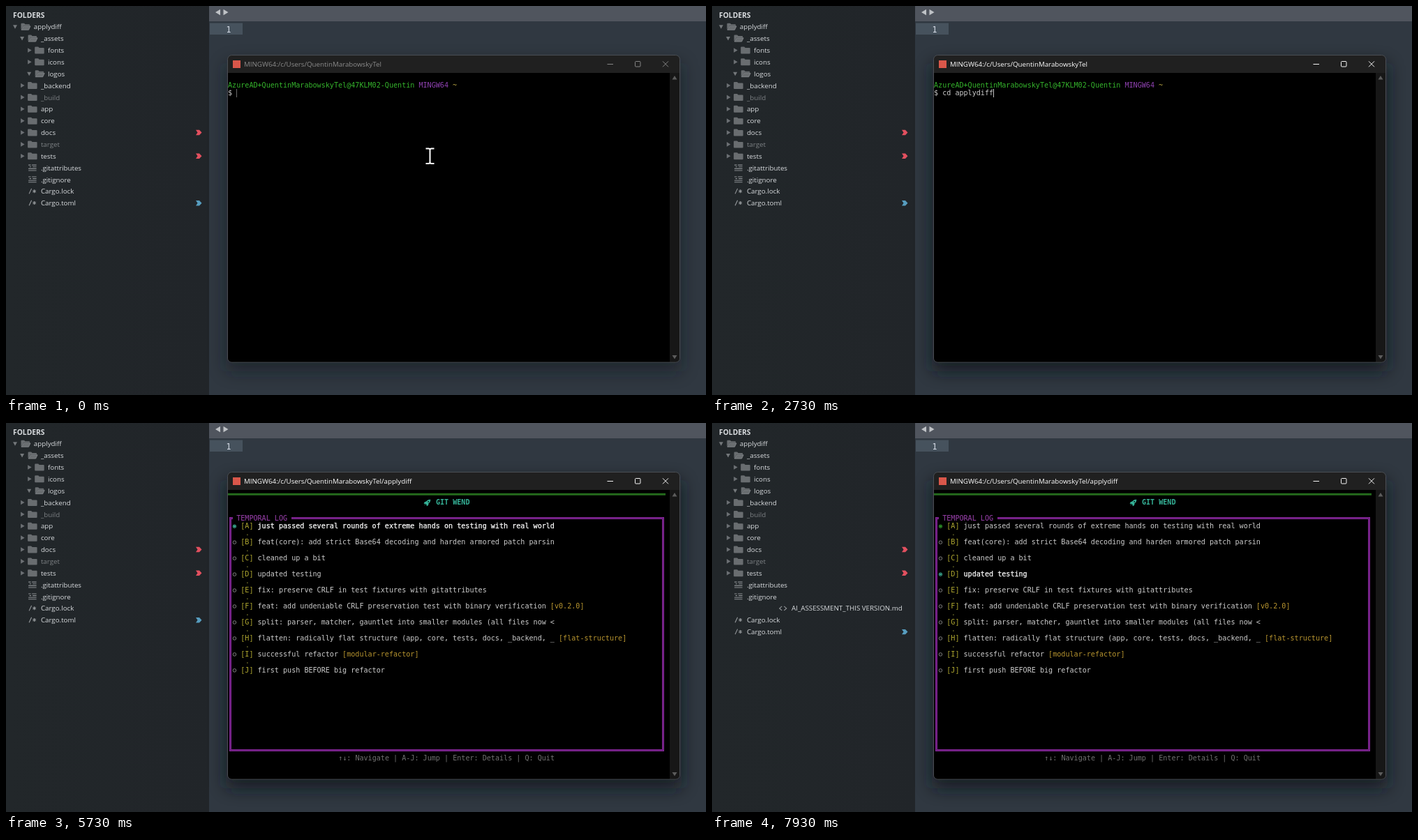
Write an HTML page that moves like this. It is 1003 by 558 pixels and loops after 8000 ms.

```html
<!DOCTYPE html>
<html lang="en">
<head>
<meta charset="utf-8">
<title>Terminal session</title>
<style>
  html, body { margin: 0; width: 100%; height: 100%; overflow: hidden; background: #303841; }
  svg { display: block; width: 1003px; height: 558px; }
  text { white-space: pre; }
  .ui { font: 9.75px "Open Sans", "Noto Sans", sans-serif; fill: #d8dbde; }
  .mono { font: 10.1px "DejaVu Sans Mono", "Liberation Mono", monospace; fill: #bfbfbf; }
</style>
</head>
<body>
<svg id="stage" viewBox="0 0 1003 558" xmlns="http://www.w3.org/2000/svg">
  <defs>
    <clipPath id="sideClip"><rect width="291" height="558"/></clipPath>
    <filter id="blur" x="-20%" y="-20%" width="140%" height="140%"><feGaussianBlur stdDeviation="12"/></filter>
    <linearGradient id="side" x1="0" x2="1" y1="0" y2="0">
      <stop offset="0" stop-color="#22272a"/><stop offset="1" stop-color="#212529"/>
    </linearGradient>
  </defs>
  <rect width="1003" height="558" fill="#303841"/>
  <rect x="291" width="712" height="22" fill="#50555e"/>
  <rect x="292" y="24.5" width="47" height="16.5" fill="#46525d"/>
  <path d="M300 9l7-4.2v8.4zM318.5 9l-7-4.2v8.4z" fill="#bfc2c6"/>
  <text x="319" y="37.5" text-anchor="middle" font-family="DejaVu Sans Mono, monospace" font-size="11.5" fill="#d8dee9">1</text>
  <rect width="291" height="558" fill="url(#side)"/>
  <g id="tree" clip-path="url(#sideClip)">
    <text class="ui" x="10" y="16.7" style="font-size:10.3px;font-weight:700">FOLDERS</text>
  </g>
  <rect id="shadow" x="315" y="82" width="653" height="442" rx="8" fill="#10121c" filter="url(#blur)"/>
  <rect x="317.5" y="70.5" width="648" height="440.5" rx="6" fill="#202020" stroke="#4a4e53"/>
  <path d="M318 96h633v414.5h-627.5a5.5 5.5 0 0 1-5.5-5.5z" fill="#000"/>
  <path d="M951 96h14v409a5.5 5.5 0 0 1-5.5 5.5h-8.5z" fill="#171717"/>
  <path d="M954.5 105.5l3.5-5.5 3.5 5.5zM954.5 501l3.5 5.5 3.5-5.5z" fill="#5c5c5c"/>
  <rect x="325" y="78" width="11" height="11" fill="#d9574a"/>
  <text id="caption" class="ui" x="341" y="87"></text>
  <path id="buttons" d="M861.5 83.5h8.5M902.5 79.5h5.5q1 0 1 1v5.5q0 1-1 1h-5.5q-1 0-1-1v-5.5q0-1 1-1zM941 79.3l8 8M949 79.3l-8 8" fill="none"/>
  <g id="shell"></g>
  <g id="log"></g>
  <path id="bar" d="M318 102.3h627" stroke="#246b1c" stroke-width="3"/>
  <rect id="caret" width="1" height="12"/>
  <g id="pointer" fill="none">
    <path d="M601.5 204.5h4q2 0 2 2 0-2 2-2h4M607.5 206v18M601.5 226h4q2 0 2-2 0 2 2 2h4" stroke="#fff" stroke-width="2"/>
  </g>
</svg>
<script>
const LOOP = 8000, COL = 6.08, LINE = 11.48, ROW = 16.87, SLIDE = 254;
const USER = "QuentinMarabowskyTel";
const HOST = "AzureAD+" + USER + "@47KLM02-Quentin";
const C = { green: "#35b52c", purple: "#8f41b1", yellow: "#bda945", cyan: "#38a99b", text: "#cccccc" };

const $ = id => document.getElementById(id);
const colX = c => 318 + c * COL;
const lineY = n => 117 + n * LINE;
const clamp = v => Math.max(0, Math.min(1, v));
const ramp = (t, a, b) => clamp((t - a) / (b - a));
const show = (el, on) => { el.style.display = on ? "" : "none"; };

function add(parent, tag, attrs = {}, content) {
  const el = document.createElementNS("http://www.w3.org/2000/svg", tag);
  for (const k in attrs) el.setAttribute(k, attrs[k]);
  if (content !== undefined) el.textContent = content;
  parent.appendChild(el);
  return el;
}

// One terminal line made of [text, colour] runs
function line(parent, col, n, ...runs) {
  const el = add(parent, "text", { class: "mono", x: colX(col), y: lineY(n) });
  for (const [s, fill] of runs) add(el, "tspan", { style: "fill:" + fill }, s);
  return el;
}

// Sidebar: [name, depth, kind, flag colour]; kinds: o open, c closed, d dimmed, t text, s source, m markup
const RED = "#e2505f", BLUE = "#579dbf";
const ITEMS = [
  ["applydiff", 0, "o"], ["_assets", 1, "o"], ["fonts", 2, "c"], ["icons", 2, "c"], ["logos", 2, "o"],
  ["_backend", 1, "c"], ["_build", 1, "d"], ["ai", 1, "c"], ["app", 1, "c"], ["core", 1, "c"],
  ["docs", 1, "c", RED], ["target", 1, "d"], ["tests", 1, "c", RED],
  [".gitattributes", 1, "t"], [".gitignore", 1, "t"], ["AI_ASSESSMENT_THIS VERSION.md", 1, "m"],
  ["Cargo.lock", 1, "s"], ["Cargo.toml", 1, "s", BLUE]
];

function icon(g, kind) {
  if (kind === "o") {
    add(g, "path", { d: "M10-2.5h6l-3 5.5z", fill: "#74787b" });
    add(g, "path", { d: "M21.5 4v-8q0-1 1-1h3.5l1.5 1.5h5.5q1 0 1 1v1h-8.5z", fill: "#696d70" });
    add(g, "path", { d: "M25.5-.8h9.5l-2.500 5.300h-10.500z", fill: "#696d70", stroke: "#8b8f92", "stroke-width": 0.8 });
  } else if (kind === "c" || kind === "d") {
    add(g, "path", { d: "M11-3.3l5.5 3.3-5.5 3.3z", fill: "#6c7074" });
    add(g, "path", { d: "M21-4q0-1 1-1h4l1.5 1.5h6q1 0 1 1v6.5q0 1-1 1h-11.5q-1 0-1-1z", fill: "#696d70" });
  } else if (kind === "t") {
    add(g, "path", { d: "M22-4h3.5M27-4h6.5M23.5-1.4h2.5M28-1.4h5.5M22 1.2h11.5M22 3.8h11.5", stroke: "#8b8f92", "stroke-width": 1.1 });
  } else if (kind === "s") {
    add(g, "path", { d: "M23 3.5l3.5-7.5M30.5-2.7v5M28.3-1.5l4.4 2.6M32.7-1.5l-4.4 2.6", stroke: "#989c9f", "stroke-width": 1.1 });
  } else {
    add(g, "path", { d: "M26-3l-3.5 3 3.5 3M29-3l3.5 3-3.5 3", fill: "none", stroke: "#989c9f", "stroke-width": 1.1 });
  }
}

const rows = ITEMS.map(([name, depth, kind, flag]) => {
  const g = add($("tree"), "g");
  const body = add(g, "g", { transform: `translate(${depth * 10.1} 0)` });
  icon(body, kind);
  add(body, "text", { class: "ui", x: 39.8, y: 3.6, style: kind === "d" ? "fill:#7d8184" : "" }, name);
  if (flag) add(g, "path", { d: "M272-3.7h5l3.5 3.7-3.5 3.7h-5l2.5-3.7z", fill: flag });
  return g;
});

// Gap opens, then the row slides in; removal runs the other way round
function aiRow(t) {
  return t < 7100
    ? { gap: ramp(t, 6556, 6688), off: 1 - ramp(t, 6688, 6920) }
    : { gap: 1 - ramp(t, 7341, 7475), off: ramp(t, 7200, 7341) };
}
const noteRow = t => ({ gap: ramp(t, 7645, 7780), off: 1 - ramp(t, 7780, 7982) });

function drawTree(t) {
  const moving = { 7: aiRow(t), 15: noteRow(t) };
  let y = 29.7;
  rows.forEach((g, i) => {
    const m = moving[i] || { gap: 1, off: 0 };
    g.setAttribute("transform", `translate(${m.off * SLIDE} ${y})`);
    show(g, m.gap === 1 && m.off < 1);
    y += ROW * m.gap;
  });
}

// Shell
const prompt = (n, ...path) => line($("shell"), 0, n, [HOST, C.green], [" MINGW64", C.purple], ...path);
prompt(0, [" ~", C.yellow]);
const prompt2 = prompt(3, [" ~/applydiff", C.yellow], [" (main)", C.cyan]);
const cmd1 = line($("shell"), 0, 1, ["", C.text]);
const cmd2 = line($("shell"), 0, 4, ["", C.text]);

const KEYS1 = [1030, 1150, 1270, 1400, 1520, 1640, 1760, 1880, 2020, 2140, 2260, 2370];
const KEYS2 = [3430, 3560, 3710, 3840, 3970, 4080, 4190, 4300];
const typed = (s, keys, t) => s.slice(0, keys.filter(k => k <= t).length);
const ENTER1 = 2760, READY = 2900, ENTER2 = 4450, CLEAR = 4860, LOG = 5020;

function drawShell(t) {
  const a = typed("cd applydiff", KEYS1, t), b = typed("git wend", KEYS2, t);
  cmd1.firstChild.textContent = "$ " + a;
  cmd2.firstChild.textContent = t >= READY ? "$ " + b : "";
  show(prompt2, t >= READY);
  show($("shell"), t < CLEAR);
  show($("bar"), t >= CLEAR);
  let col = 0, n = 5;
  if (t < ENTER1) { col = 2 + a.length; n = 1; }
  else if (t < READY) n = 2;
  else if (t < ENTER2) { col = 2 + b.length; n = 4; }
  const caret = $("caret");
  caret.setAttribute("x", Math.round(colX(col) + 0.3));
  caret.setAttribute("y", Math.round(lineY(n) - 9.5));
  caret.setAttribute("fill", t < FOCUS ? "#6a6a6a" : "#bfbfbf");
  show(caret, t < LOG);
}

// Log viewer
const COMMITS = [
  ["just passed several rounds of extreme hands on testing with real world"],
  ["feat(core): add strict Base64 decoding and harden armored patch parsin"],
  ["cleaned up a bit"],
  ["updated testing"],
  ["fix: preserve CRLF in test fixtures with gitattributes"],
  ["feat: add undeniable CRLF preservation test with binary verification", "v0.2.0"],
  ["split: parser, matcher, gauntlet into smaller modules (all files now <"],
  ["flatten: radically flat structure (app, core, tests, docs, _backend, _", "flat-structure"],
  ["successful refactor", "modular-refactor"],
  ["first push BEFORE big refactor"]
];
const log = $("log");
line(log, 49, 0, ["GIT WEND", "#35b398"]).style.fontWeight = "700";
add(log, "path", { d: "M608 110q-4 0-6 3l-2 .5-1 2 2 0 2 2 0 1.5 2-1.5 0-2q3-2 3-5.5zM599.5 118l1.8-1.8", fill: "#35b398", stroke: "#35b398", "stroke-width": 0.7 });
add(log, "circle", { cx: 605.2, cy: 112.8, r: 0.9, fill: "#000" });
const FRAME = "M325 136.500h-3.500v333h620v-333h-532.500";
add(log, "path", { d: FRAME, fill: "none", stroke: "#85289a", "stroke-width": 3 });
add(log, "path", { d: FRAME, fill: "none", stroke: "#641a74", "stroke-width": 1 });
line(log, 2, 2, ["TEMPORAL LOG", "#9c40ae"]);
line(log, 26, 32, ["↑↓: Navigate | A-J: Jump | Enter: Details | Q: Quit", "#727272"]);

const entries = COMMITS.map(([msg, tag], i) => {
  const n = 3 + i * 2, cy = lineY(n) - 3.2;
  const ring = add(log, "circle", { cx: 327.4, cy, r: 2.3, fill: "none", "stroke-width": 0.9 });
  const dot = add(log, "circle", { cx: 327.4, cy, r: 1.4 });
  const runs = [["[" + "ABCDEFGHIJ"[i] + "] ", "#b0a830"], [msg, C.text]];
  if (tag) runs.push([" [" + tag + "]", "#b8952f"]);
  const el = line(log, 3, n, ...runs);
  if (i < 9) add(log, "rect", { x: 345.3, y: cy + 11.2, width: 1.2, height: 1.8, fill: "#74742c" });
  return { ring, dot, msg: el.childNodes[1] };
});

const MOVES = [6450, 7130, 7580];
function drawLog(t) {
  show(log, t >= LOG);
  const sel = MOVES.filter(m => m <= t).length;
  entries.forEach((e, i) => {
    const on = i === sel, colour = on ? "#3fb79d" : i ? "#8c8c8c" : "#2f9a2a";
    e.ring.setAttribute("stroke", colour);
    e.dot.setAttribute("fill", on || !i ? colour : "none");
    e.msg.style.fill = on ? "#ffffff" : C.text;
    e.msg.style.stroke = on ? "#ffffff" : "none";
    e.msg.style.strokeWidth = 0.25;
  });
}

// Window chrome
const FOCUS = 420, HIDE = 1030;
function drawWindow(t) {
  const active = t >= FOCUS, caption = $("caption");
  caption.textContent = "MINGW64:/c/Users/" + USER + (t >= READY ? "/applydiff" : "");
  caption.style.fill = active ? "#ffffff" : "#8b8b8b";
  $("buttons").setAttribute("stroke", active ? "#f4f4f4" : "#858585");
  $("shadow").setAttribute("opacity", active ? 0.75 : 0.5);
  show($("pointer"), t < HIDE);
}

function render(t) {
  drawWindow(t);
  drawTree(t);
  drawShell(t);
  drawLog(t);
}

const start = performance.now();
function tick() {
  render((performance.now() - start) % LOOP);
  requestAnimationFrame(tick);
}
render(0);
requestAnimationFrame(tick);
</script>
</body>
</html>
```
